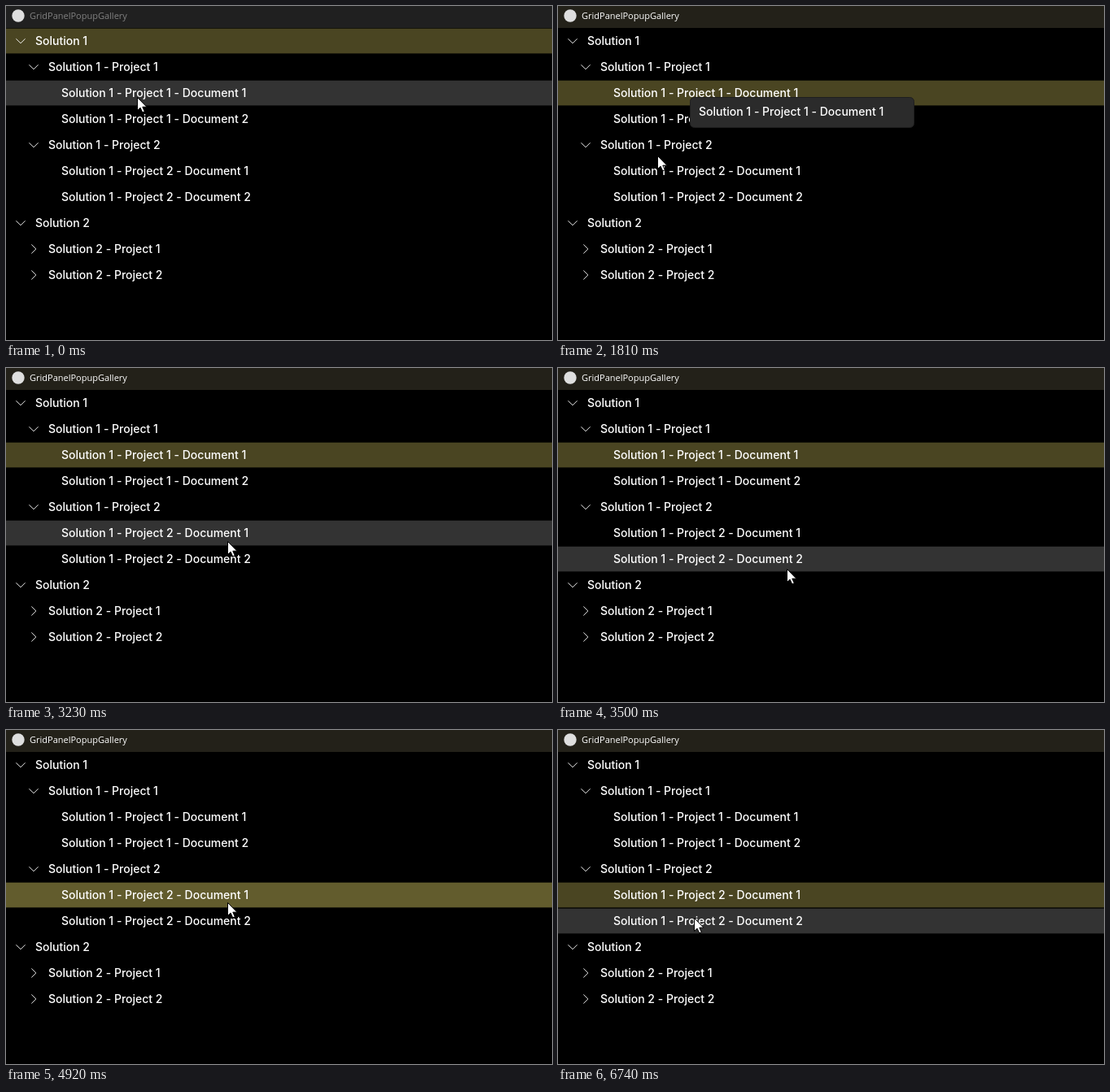
These frames come from a looping animation (671 px wide and 411 px high, 8 s). An HTML page with a canvas:

```html
<!DOCTYPE html>
<html lang="en">
<head>
<meta charset="utf-8">
<title>Tree view</title>
<style>
  html, body { margin: 0; width: 100%; height: 100%; overflow: hidden; background: #000; }
  canvas { display: block; }
</style>
</head>
<body>
<canvas id="stage" width="671" height="411"></canvas>
<script>
const ctx = document.getElementById('stage').getContext('2d');
const LOOP = 8000, TICK = 69;
const ROW_TOP = 27.7, ROW_PITCH = 32, ROW_HEIGHT = 30.7;
const COLOR = {
  hover: '#333333', selected: '#4a4522', selectedHover: '#625c2d', pressed: '#6f6833',
  popup: '#2b2b2b', popupBorder: '#1f1f1f'
};

// [label, depth, chevron]
const rows = [
  ['Solution 1', 0, 'down'],
  ['Solution 1 - Project 1', 1, 'down'],
  ['Solution 1 - Project 1 - Document 1', 2],
  ['Solution 1 - Project 1 - Document 2', 2],
  ['Solution 1 - Project 2', 1, 'down'],
  ['Solution 1 - Project 2 - Document 1', 2],
  ['Solution 1 - Project 2 - Document 2', 2],
  ['Solution 2', 0, 'down'],
  ['Solution 2 - Project 1', 1, 'right'],
  ['Solution 2 - Project 2', 1, 'right']
];

const popups = [
  { from: 330, to: 2300, x: 162, y: 112, w: 276, row: 2 },
  { from: 5530, to: 6600, x: 268, y: 210, w: 278, row: 5 }
];

// Pointer path: [time, x, y]
const path = [
  [0, 161, 112], [1120, 161, 112], [1500, 144, 142], [1810, 122, 184], [1950, 120, 198],
  [2160, 119, 204], [3020, 119, 204], [3230, 272, 213], [3510, 284, 258], [3850, 271, 214],
  [4850, 271, 214], [5060, 274, 207], [5190, 274, 207], [5330, 267, 211],
  [6050, 267, 211], [6330, 167, 231], [LOOP, 167, 231]
];

const arrow = new Path2D('M.5 .5V16.6L4.1 13.2 6.7 18.9 9.3 17.8 6.8 12.2H11.9Z');
const chevrons = {
  down: new Path2D('M-5.6 -2.7L0 2.8 5.6 -2.7'),
  right: new Path2D('M-2.7 -5.6L2.8 0 -2.7 5.6')
};

const within = (t, from, to) => t >= from && t < to;

// The pointer is sampled in ticks, so it moves in small jumps.
function pointerAt(t) {
  const i = path.findIndex(key => key[0] > t);
  const [t0, x0, y0] = path[i - 1], [t1, x1, y1] = path[i];
  const steps = Math.round((t1 - t0) / TICK);
  const u = Math.floor((t - t0) / (t1 - t0) * steps + 1e-6) / steps;
  return { x: Math.round(x0 + (x1 - x0) * u), y: Math.round(y0 + (y1 - y0) * u) };
}

function text(label, x, baseline, font = '500 14px Inter, sans-serif', color = '#fff') {
  ctx.font = font;
  ctx.fillStyle = color;
  ctx.fillText(label, x, baseline);
}

function drawTitleBar(active) {
  ctx.fillStyle = active ? '#232119' : '#202020';
  ctx.fillRect(0, 0, 671, 27);
  ctx.fillStyle = '#dedede';
  ctx.beginPath();
  ctx.arc(15, 12, 7.7, 0, 2 * Math.PI);
  ctx.fill();
  text('GridPanelPopupGallery', 29, 16, '500 11px "Open Sans", sans-serif', active ? '#fff' : '#808080');
}

function rowColor(row, t, hovered) {
  const selected = t < 140 ? 0 : t < 4250 ? 2 : 5;
  if (row !== selected) return row === hovered && COLOR.hover;
  if (within(t, 4250, 4320)) return COLOR.pressed;
  return row === hovered ? COLOR.selectedHover : COLOR.selected;
}

function drawRow(row, t, hovered) {
  const [label, depth, chevron] = rows[row];
  const top = row * ROW_PITCH, indent = depth * 16;
  const color = rowColor(row, t, hovered);
  if (color) {
    ctx.fillStyle = color;
    ctx.fillRect(0, ROW_TOP + top, 671, ROW_HEIGHT);
  }
  if (chevron) {
    ctx.save();
    ctx.translate(18 + indent, 43 + top);
    ctx.strokeStyle = '#fff';
    ctx.lineWidth = 0.9;
    ctx.stroke(chevrons[chevron]);
    ctx.restore();
  }
  text(label, 36 + indent, 48 + top);
}

function drawPopup({ x, y, w, row }) {
  ctx.fillStyle = COLOR.popup;
  ctx.strokeStyle = COLOR.popupBorder;
  ctx.lineWidth = 1;
  ctx.beginPath();
  ctx.roundRect(x + 0.5, y + 0.5, w - 1, 37, 5);
  ctx.fill();
  ctx.stroke();
  text(rows[row][0], x + 11, y + 23);
}

function drawPointer({ x, y }) {
  ctx.save();
  ctx.translate(x, y);
  ctx.fillStyle = '#fff';
  ctx.strokeStyle = '#000';
  ctx.lineWidth = 1;
  ctx.fill(arrow);
  ctx.stroke(arrow);
  ctx.restore();
}

function draw(now) {
  const t = now % LOOP;
  const pointer = pointerAt(t);
  const hoverOn = t < 400 || within(t, 2430, 5660) || t >= 6740;
  const hovered = hoverOn ? Math.floor((pointer.y - 28) / ROW_PITCH) : -1;

  ctx.fillStyle = '#000';
  ctx.fillRect(0, 0, 671, 411);
  drawTitleBar(t >= 140);
  rows.forEach((_, row) => drawRow(row, t, hovered));
  popups.filter(p => within(t, p.from, p.to)).forEach(drawPopup);
  drawPointer(pointer);
}

const start = performance.now();
function frame() {
  draw(performance.now() - start);
  requestAnimationFrame(frame);
}
frame();
</script>
</body>
</html>
```
